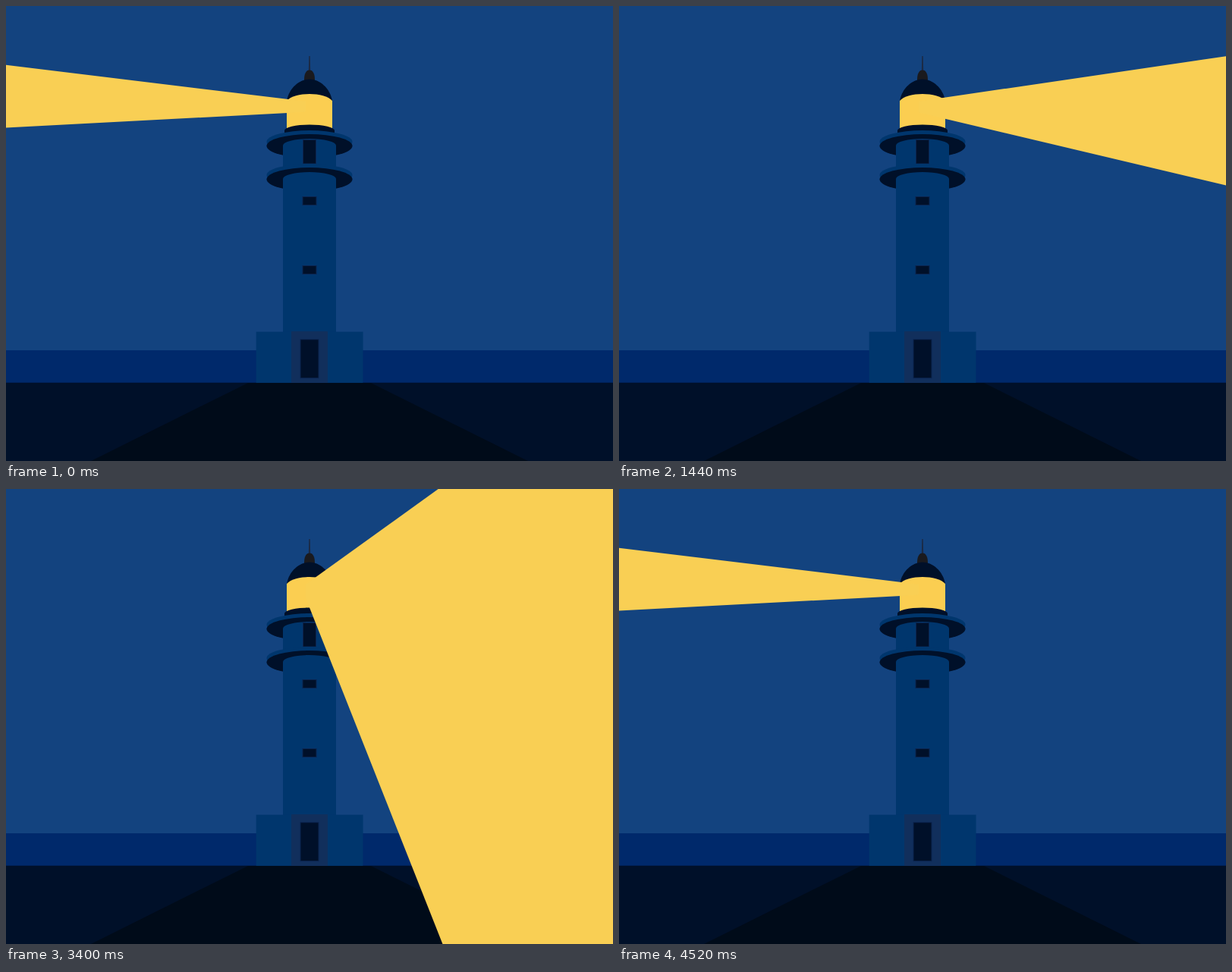
Animation, 800 px wide and 600 px high, one loop 4560 ms. Source, as an HTML page:

```html
<!DOCTYPE html>
<html lang="en">
<head>
<meta charset="utf-8">
<title>Lighthouse</title>
<style>
  html, body { margin: 0; width: 100%; height: 100%; overflow: hidden; background: #13437f; }
  svg { display: block; width: 100vw; height: 100vh; }
  .night { fill: #001029; }
  .wall { fill: #00366d; }
  .lamp { fill: #fbce51; }
  .light { fill: #f9cf54; }
  .frame { stroke: #0b2550; stroke-width: 1; }
</style>
</head>
<body>
<svg viewBox="0 0 800 600">
  <rect width="800" height="600" fill="#13437f"/>
  <rect y="454" width="800" height="50" fill="#00296b"/>
  <rect class="night" y="496.7" width="800" height="104"/>
  <path d="M319 497H481L688 600H112Z" fill="#000b19"/>

  <!-- lantern -->
  <path d="M399.3 66h1.4l.5 20h-2.4z" fill="#1c2a44"/>
  <path d="M393 98C393 89 395.5 84.5 400 84.5S407 89 407 98Z" fill="#1a1a1e"/>
  <path class="night" d="M370 125C373 108 387 96.5 400 96.5S427 108 430 125Z"/>
  <path class="lamp" d="M370 125C380 113 420 113 430 125V164H370Z"/>
  <path class="night" d="M367 164A33 7.5 0 0 1 433 164V170H367Z"/>

  <!-- upper gallery -->
  <ellipse class="wall" cx="400" cy="179" rx="56.5" ry="15"/>
  <ellipse class="night" cx="400" cy="184.5" rx="56.5" ry="15.5"/>
  <path class="wall" d="M365 184A35 9 0 0 1 435 184V226H365Z"/>
  <rect class="night frame" x="391.5" y="176.5" width="17" height="31.5"/>

  <!-- lower gallery and tower -->
  <ellipse class="wall" cx="400" cy="223" rx="56.5" ry="15"/>
  <ellipse class="night" cx="400" cy="228.5" rx="56.5" ry="15.5"/>
  <path class="wall" d="M365 228A35 9 0 0 1 435 228V435H365Z"/>
  <rect class="night frame" x="391" y="251.5" width="18" height="11"/>
  <rect class="night frame" x="391" y="342.5" width="18" height="11"/>

  <!-- base -->
  <rect class="wall" x="329.7" y="429.6" width="140.8" height="67.3"/>
  <rect x="376" y="429" width="48" height="68" fill="#112f5c"/>
  <rect class="night frame" x="388" y="439.7" width="24" height="51"/>

  <rect class="light" id="flash" width="800" height="600" opacity="0"/>
  <path class="light" id="beam"/>
</svg>
<script>
const LOOP = 4560, HALF = LOOP / 2;
const FRONT = 1019, LEAVE = 1115.7;  // the beam faces the viewer between these times
const AXIS = 395, FAR = 4000;
const beam = document.getElementById('beam');
const flash = document.getElementById('flash');
const clamp = v => Math.min(1, Math.max(0, v));

// Angle of the lower edge from the vertical in degrees, left is negative:
// it speeds up towards the front, then settles exponentially on the right.
function sweep(t) {
  if (t < FRONT) return -87 * (1 - (t / FRONT) ** 2.6);
  return 86.8 * (1 - Math.exp(-0.0066 * Math.max(0, t - LEAVE)));
}

function draw(time) {
  const t = time % LOOP;
  const swing = t <= HALF ? t : LOOP - t;
  const side = swing < FRONT ? -1 : 1;
  const angle = sweep(swing) * Math.PI / 180;
  const across = Math.sin(angle), down = Math.cos(angle);

  // The upper edge rises in proportion to the fall of the lower one.
  const up = (0.098 - 0.01 * side) * Math.abs(across) + (0.256 - 0.006 * side) * down;
  const top = 125.8, low = 139.5 + 4.5 * down;
  const x = AXIS + FAR * across;
  const points = [
    [AXIS, top], [x, top - FAR * up], [AXIS + side * FAR, 133], [x, low + FAR * down], [AXIS, low]
  ];
  beam.setAttribute('d', 'M' + points.map(p => p.map(v => v.toFixed(2)).join(' ')).join('L') + 'Z');

  const fromFront = Math.abs(swing - (FRONT + LEAVE) / 2);
  flash.setAttribute('opacity', clamp((91 - fromFront) / 36).toFixed(3));
}

const start = performance.now();
function tick() {
  draw(performance.now() - start);
  requestAnimationFrame(tick);
}
tick();
</script>
</body>
</html>
```
